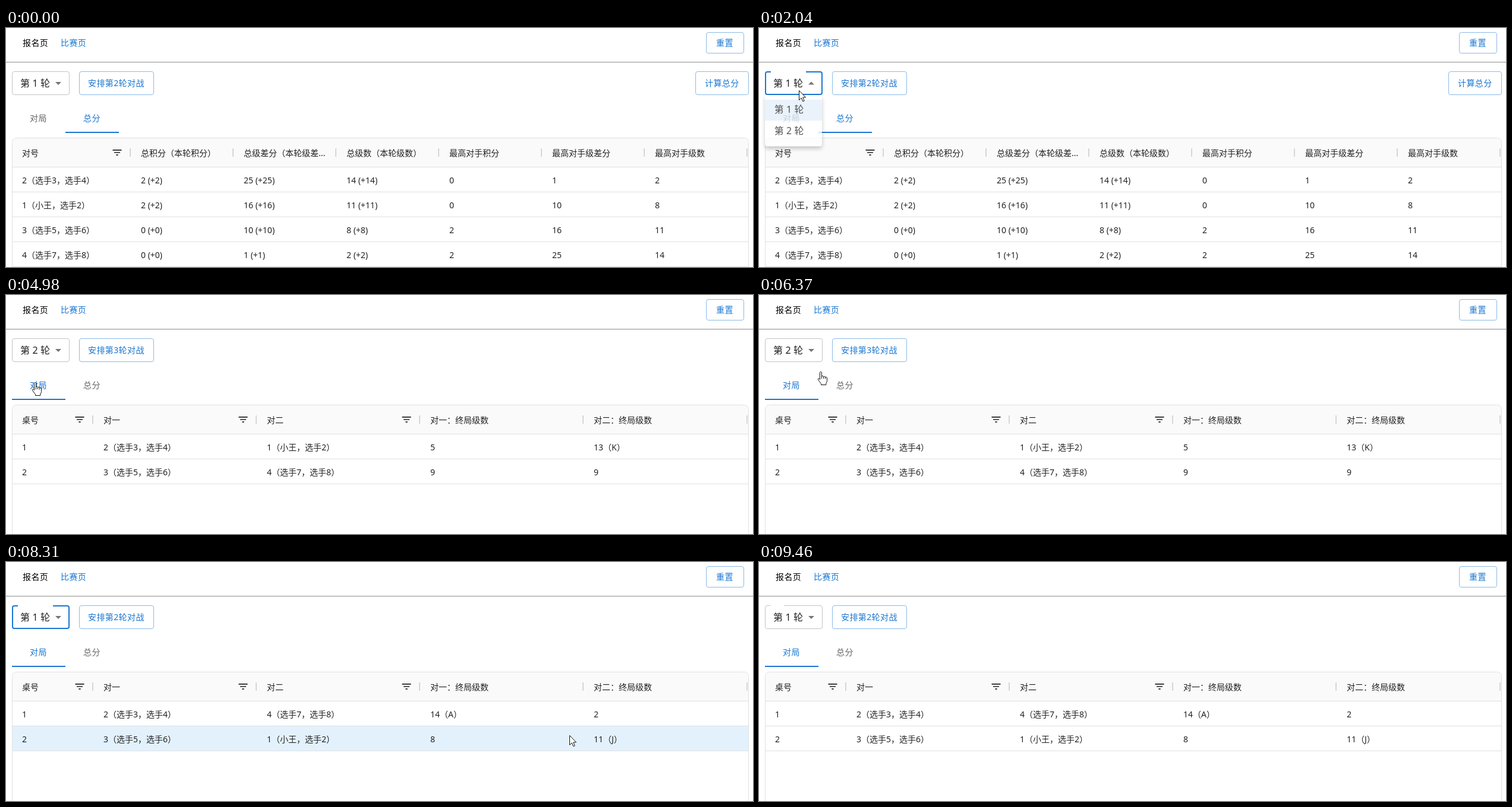
An HTML page for the animation above (9530 ms loop, 1257 by 403 pixels).

```html
<!DOCTYPE html>
<html lang="zh-CN">
<head>
<meta charset="utf-8">
<title>比赛页</title>
<style>
html, body { margin: 0; width: 100%; height: 100%; overflow: hidden; background: #fff; }
svg { display: block; width: 100%; height: 100%; }
text { font: 14px "Noto Sans", "Noto Sans CJK SC", "Noto Sans CJK", sans-serif; fill: #212121; }
.btn { letter-spacing: .4px; }
.round { font-size: 16px; letter-spacing: .15px; }
.paper { filter: drop-shadow(0 4px 4px rgba(0,0,0,.28)); }
</style>
</head>
<body>
<svg id="stage" viewBox="0 0 1257 403" xmlns="http://www.w3.org/2000/svg"></svg>
<script>
const LOOP = 9530, STEP = 70, BLUE = '#1976d2', GREY = '#666', LINE = '#e0e0e0';
const stage = document.getElementById('stage');

// The screen refreshes every STEP ms, counted from the start of each burst.
const BURSTS = [0, 920, 2380, 3610, 4420, 5250, 7200, 8170, 8930, 9460];

// Pointer path: time, x, y
const PATH = [
  [920, 420, 338], [1060, 300, 270], [1270, 160, 180], [1480, 80, 118], [1760, 67, 105],
  [2379, 67, 105], [2590, 58, 150], [2800, 49, 168], [3600, 49, 168], [3790, 49, 148],
  [5200, 49, 148], [5250, 70, 165], [5460, 300, 240], [5670, 700, 290], [5880, 960, 306],
  [6160, 855, 194], [6230, 560, 170], [6300, 260, 142], [6370, 104, 130], [6580, 67, 105],
  [7190, 67, 105], [7480, 56, 134], [8100, 56, 134], [8170, 180, 175], [8310, 948, 292],
  [8730, 1010, 297], [8920, 1010, 297], [8930, 1080, 240], [9000, 1190, 165], [9060, 1250, 165]
];
const MENUS = [{ open: 1900, close: 2730 }, { open: 6860, close: 7550 }];
const BLURS = [4420, 9460];
const TAB_SWITCH = 4560;

const PAIRS = ['', '1（小王，选手2）', '2（选手3，选手4）', '3（选手5，选手6）', '4（选手7，选手8）'];
const TABLES = {
  total: {
    x: [11, 211, 384, 557, 730, 903, 1076], filters: 1,
    head: ['对号', '总积分（本轮积分）', '总级差分（本轮级差...', '总级数（本轮级数）', '最高对手积分', '最高对手级差分', '最高对手级数'],
    1: [
      [PAIRS[2], '2 (+2)', '25 (+25)', '14 (+14)', 0, 1, 2],
      [PAIRS[1], '2 (+2)', '16 (+16)', '11 (+11)', 0, 10, 8],
      [PAIRS[3], '0 (+0)', '10 (+10)', '8 (+8)', 2, 16, 11],
      [PAIRS[4], '0 (+0)', '1 (+1)', '2 (+2)', 2, 25, 14]
    ],
    2: [
      [PAIRS[1], '4 (+2)', '37 (+21)', '24 (+13)', 2, 30, 19],
      [PAIRS[2], '2 (+0)', '30 (+5)', '19 (+5)', 4, 37, 24],
      [PAIRS[3], '1 (+1)', '23 (+13)', '17 (+9)', 4, 37, 24],
      [PAIRS[4], '1 (+1)', '14 (+13)', '11 (+9)', 2, 30, 19]
    ]
  },
  games: {
    x: [11, 148, 423, 698, 973], filters: 3,
    head: ['桌号', '对一', '对二', '对一：终局级数', '对二：终局级数'],
    1: [[1, PAIRS[2], PAIRS[4], '14（A）', 2], [2, PAIRS[3], PAIRS[1], 8, '11（J）']],
    2: [[1, PAIRS[2], PAIRS[1], 5, '13（K）'], [2, PAIRS[3], PAIRS[4], 9, 9]]
  }
};

const clamp = v => Math.max(0, Math.min(1, v));
const mix = (a, b, p) => a + (b - a) * p;

// cubic-bezier(.4, 0, .2, 1)
function ease(p) {
  let lo = 0, hi = 1, u = .5;
  for (let i = 0; i < 20; i++) {
    u = (lo + hi) / 2;
    if (1.2 * u * (1 - u) ** 2 + .6 * u * u * (1 - u) + u ** 3 < clamp(p)) lo = u; else hi = u;
  }
  return u * u * (3 - 2 * u);
}

const text = (x, y, s, color = '', cls = '') =>
  `<text x="${x}" y="${y}" class="${cls}"${color && ` style="fill:${color}"`}>${s}</text>`;
const rect = (x, y, w, h, fill, extra = '') =>
  `<rect x="${x}" y="${y}" width="${w}" height="${h}" fill="${fill}" ${extra}/>`;
const outline = (x, y, w, h, color, weight = 1) =>
  rect(x + weight / 2, y + weight / 2, w - weight, h - weight, 'none',
    `rx="${4 - weight / 2}" stroke="${color}" stroke-width="${weight}"`);
const button = (x, y, w, h, label, tx) =>
  outline(x, y, w, h, '#8cbae8') + text(tx, y + h / 2 + 5, label, BLUE, 'btn');

function snap(t) {
  const start = BURSTS.filter(b => b <= t).pop();
  return start + Math.floor((t - start) / STEP) * STEP;
}

function pointerAt(t) {
  if (t < PATH[0][0] || t >= 9060) return null;
  const i = PATH.findIndex(k => k[0] > t);
  const [t0, x0, y0] = PATH[i - 1], [t1, x1, y1] = PATH[i];
  const p = (t - t0) / (t1 - t0);
  return { x: Math.round(mix(x0, x1, p)), y: Math.round(mix(y0, y1, p)) };
}

const inside = (c, x, y, w, h) => c && c.x >= x && c.x < x + w && c.y >= y && c.y < y + h;

function drawTable(table, rows, hovered) {
  let out = '<path d="M10.5 403V193.5Q10.5 185.5 18.5 185.5H1241.5Q1249.5 185.5 1249.5 193.5V403" fill="#fff" stroke="#e0e0e0"/>' +
    '<path d="M11 234V194Q11 186 19 186H1241Q1249 186 1249 194V234Z" fill="#fafafa"/>' +
    rect(11, 234, 1238, 1, LINE);
  table.x.forEach((x, i) => {
    const edge = (table.x[i + 1] || 1249) - 2;
    out += text(x + 16, 216, table.head[i]) + rect(edge - 1, 203, 2, 14, '#d6d6d6');
    if (i < table.filters)
      out += `<path transform="translate(${edge - 32} 200) scale(.8333)" fill="#212121" d="M10 18h4v-2h-4zM3 6v2h18V6zM6 13h12v-2H6z"/>`;
  });
  rows.forEach((row, r) => {
    const y = 235 + 42 * r;
    if (r === hovered) out += rect(11, y, 1238, 41, '#e3f1fd');
    out += rect(11, y + 41, 1238, 1, LINE);
    row.forEach((cell, i) => out += text(table.x[i] + 16, y + 27, cell));
  });
  return out;
}

function drawSelect(round, t, focused, hovered, opened) {
  let out = focused ? outline(10, 73, 97, 40, BLUE, 2)
    : outline(10, 73, 97, 40, hovered ? '#212121' : '#c4c4c4');
  if (focused) out += rect(20, 72, 59, 4, '#fff');
  else if (BLURS.some(b => t >= b && t < b + STEP)) out += rect(19, 72, 23, 3, '#fff');
  return out + text(24, 99, `第 ${round} 轮`, '', 'round') +
    `<path d="${opened ? 'M83 95.5h10l-5-5z' : 'M83 91h10l-5 5z'}" fill="#757575"/>`;
}

function drawMenu(menu, t, round, pointer) {
  const closing = t >= menu.close;
  const shown = p => closing ? 1 - ease(p) : ease(p);
  const p = closing ? (t - menu.close) / 210 : (t - menu.open) / 280;
  const grow = shown(closing ? p : p * 1.5);
  const opacity = shown(p);
  if (opacity < .01) return '';
  let out = rect(10, 113, 97, 88, '#fff', 'rx="4"');
  for (const n of [1, 2]) {
    const y = 85 + 36 * n;
    if (n === round) out += rect(10, y, 97, 36, BLUE, 'opacity=".11"');
    else if (inside(pointer, 10, y, 97, 36)) out += rect(10, y, 97, 36, '#000', 'opacity=".04"');
    out += text(26, y + 23, `第 ${n} 轮`, '', 'round');
  }
  const sx = mix(.75, 1, grow), sy = mix(.5625, 1, grow);
  return `<g class="paper" opacity="${opacity}" transform="translate(10 113) scale(${sx} ${sy}) translate(-10 -113)">${out}</g>`;
}

function drawTabs(t, total) {
  const slide = t < TAB_SWITCH ? 0 : ease((t - TAB_SWITCH) / 300);
  let out = '';
  if (t >= 4420 && t < 5050) {
    const r = mix(10, 62, ease((t - 4420) / 450)), fade = .22 * (1 - clamp((t - 4520) / 480)) ** 2;
    out += `<clipPath id="tab"><rect x="10" y="129" width="90" height="48"/></clipPath>
      <circle cx="49" cy="149" r="${r}" fill="${BLUE}" opacity="${fade}" clip-path="url(#tab)"/>`;
  }
  return out + text(40, 157, '对局', total ? GREY : BLUE, 'btn') +
    text(130, 157, '总分', total ? BLUE : GREY, 'btn') +
    rect(mix(100, 10, slide), 175, 90, 2, BLUE);
}

function drawPointer({ x, y }, hand) {
  const shape = hand
    ? 'M-1.5 .5Q0-2.3 1.5 .5V7Q3.2 5.2 4.6 7.6Q6.4 6 7.6 8.4Q9.8 7.4 10.5 10V14.5Q10.5 17 8.8 19V21.5H.5V19.5L-4.3 13.2Q-5.6 11 -3.6 10.4L-1.5 12.4ZM1.5 7V11M4.6 7.6V11M7.6 8.4V11.5'
    : 'M.5.5V16.5L4.2 13L6.8 18.8L9.2 17.8L6.7 12H11.5Z';
  return `<path transform="translate(${x} ${y})" d="${shape}" fill="#fff" stroke="#111" stroke-linejoin="round"/>`;
}

function scene(t) {
  const pointer = pointerAt(t);
  const menu = MENUS.find(m => t >= m.open && t < m.close + 210);
  const opened = menu && t < menu.close;
  const total = t < TAB_SWITCH;
  const round = t >= MENUS[0].close && t < MENUS[1].close ? 2 : 1;
  const shownRound = t >= MENUS[0].close + STEP && t < MENUS[1].close + STEP ? 2 : 1;
  const focused = MENUS.some((m, i) => t >= m.open && t < BLURS[i]);
  const overSelect = inside(pointer, 10, 73, 97, 40);
  const table = total ? TABLES.total : TABLES.games;
  const rows = table[shownRound];
  const hovered = !menu && inside(pointer, 11, 235, 1238, 42 * rows.length)
    ? Math.floor((pointer.y - 235) / 42) : -1;
  const hand = opened ? inside(pointer, 10, 121, 97, 72)
    : overSelect || inside(pointer, 10, 129, 180, 48);

  return text(28, 30, '报名页', '#000', 'btn') + text(92, 30, '比赛页', BLUE, 'btn') +
    button(1178, 7, 64, 36, '重置', 1195) +
    rect(0, 57, 1257, 1, '#9a9a9a') + rect(0, 58, 1257, 1, '#eee') +
    drawSelect(round, t, focused, overSelect, opened) +
    button(123, 73, 126, 40, `安排第${shownRound + 1}轮对战`, 138) +
    (total ? button(1160, 73, 90, 40, '计算总分', 1176) : '') +
    drawTabs(t, total) + drawTable(table, rows, hovered) +
    (menu ? drawMenu(menu, t, round, pointer) : '') +
    (pointer ? drawPointer(pointer, hand) : '');
}

let last = -1;
const began = performance.now();
function frame() {
  const t = snap((performance.now() - began) % LOOP);
  if (t !== last) stage.innerHTML = scene(last = t);
  requestAnimationFrame(frame);
}
frame();
</script>
</body>
</html>
```
